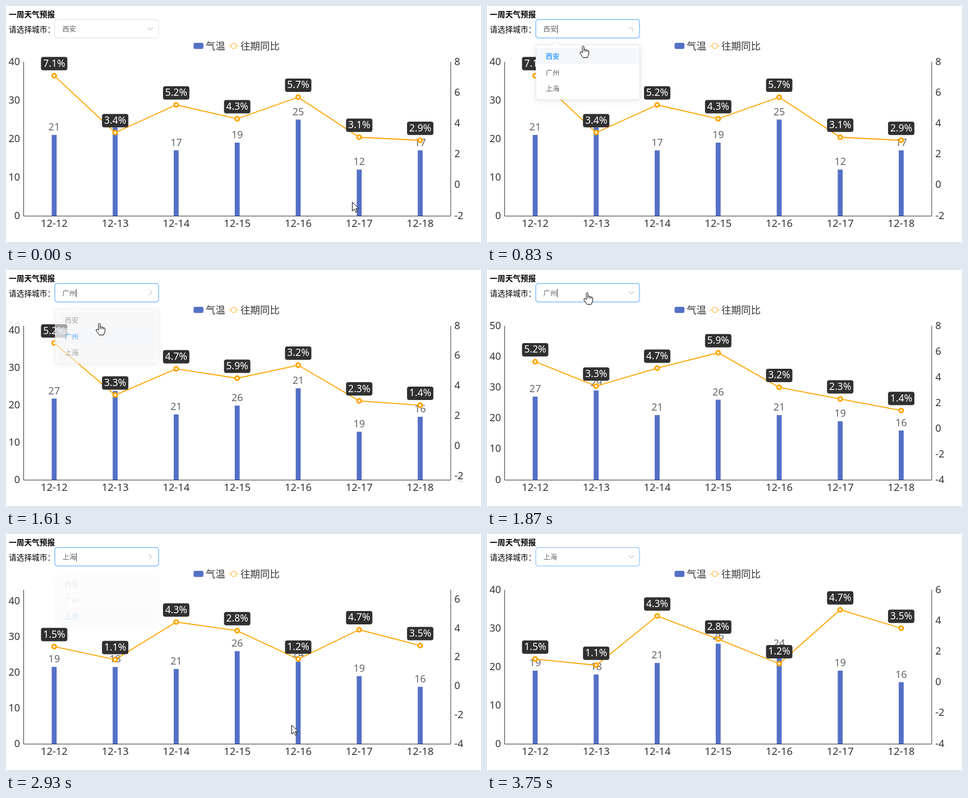
An HTML page with a canvas for the animation above (3790 ms loop, 847 by 423 pixels).

```html
<!DOCTYPE html>
<html lang="zh-CN">
<head>
<meta charset="utf-8">
<title>一周天气预报</title>
<style>
html, body { margin: 0; width: 100%; height: 100%; overflow: hidden; background: #fff; }
canvas { display: block; }
</style>
</head>
<body>
<canvas id="stage" width="847" height="423"></canvas>
<script>
const ctx = document.getElementById('stage').getContext('2d');
const LOOP = 3790;
const LATIN = '"Noto Sans", "Open Sans", sans-serif';
const CJK = '"Noto Sans CJK SC", "Noto Sans CJK", sans-serif';
const BLUE = '#409eff', BAR = '#5470c6', ORANGE = '#ffa500';

const days = [12, 13, 14, 15, 16, 17, 18].map(d => '12-' + d);
const cities = [
  { name: '西安', temp: [21, 23, 17, 19, 25, 12, 17], rate: [7.1, 3.4, 5.2, 4.3, 5.7, 3.1, 2.9], left: [0, 40], right: [-2, 8] },
  { name: '广州', temp: [27, 29, 21, 26, 21, 19, 16], rate: [5.2, 3.3, 4.7, 5.9, 3.2, 2.3, 1.4], left: [0, 50], right: [-4, 8] },
  { name: '上海', temp: [19, 18, 21, 26, 24, 19, 16], rate: [1.5, 1.1, 4.3, 2.8, 1.2, 4.7, 3.5], left: [0, 40], right: [-4, 6] }
];

const plot = { x0: 31.5, x1: 793, top: 100, bottom: 376 };
const menus = [
  { open: 600, shut: 1490, shutEnd: 1760, turn: 620, back: 1500, active: 0, hoverAt: 860, hover: 1 },
  { open: 2010, shut: 2650, shutEnd: 2970, turn: 2070, back: 2840, active: 1, hoverAt: 2340, hover: 2 }
];
const clicks = [580, 1410, 1990, 2570];
// pointer hot spot: time, x, y
const trail = [
  [40, 618, 352], [200, 460, 170], [310, 238, 3], [350, 200, 13], [530, 179, 42],
  [680, 179, 42], [1080, 157, 122], [1120, 159, 126], [1490, 159, 126], [1830, 178, 41],
  [2070, 178, 41], [2320, 143, 136], [2490, 142, 147], [2830, 142, 147],
  [2930, 510, 343], [2990, 514, 350], [3080, 560, 445]
];

const lerp = (a, b, p) => a + (b - a) * p;
const ramp = (t, a, b) => Math.min(1, Math.max(0, (t - a) / (b - a)));
const cubicInOut = p => p < .5 ? 4 * p ** 3 : 1 - 4 * (1 - p) ** 3;
const cubicOut = p => 1 - (1 - p) ** 3;
const within = (t, a, b) => t >= a && t < b;
const scaleY = (v, [lo, hi]) => lerp(plot.bottom, plot.top, (v - lo) / (hi - lo));
const dayX = i => plot.x0 + (plot.x1 - plot.x0) * (i + .5) / days.length;

function text(str, x, y, size, color, align = 'left', family = LATIN, weight = '') {
  ctx.font = `${weight} ${size}px ${family}`;
  ctx.textAlign = align;
  ctx.fillStyle = color;
  ctx.fillText(str, x, y + size * (family === CJK ? .38 : .335));
}

function box(x, y, w, h, r, fill, stroke) {
  ctx.beginPath();
  ctx.roundRect(x, y, w, h, r);
  if (fill) { ctx.fillStyle = fill; ctx.fill(); }
  if (stroke) { ctx.strokeStyle = stroke; ctx.lineWidth = 1; ctx.stroke(); }
}

function polyline(points, color, width) {
  ctx.beginPath();
  points.forEach(([x, y]) => ctx.lineTo(x, y));
  ctx.strokeStyle = color;
  ctx.lineWidth = width;
  ctx.stroke();
}

function ring(x, y, r, width) {
  ctx.beginPath();
  ctx.arc(x, y, r, 0, 7);
  ctx.fillStyle = '#fff';
  ctx.fill();
  ctx.strokeStyle = ORANGE;
  ctx.lineWidth = width;
  ctx.stroke();
}

function axisLabels(from, to, p, step, x, align) {
  for (let v = to[0]; v <= to[1]; v += step) {
    const kept = v >= from[0] && v <= from[1];
    ctx.globalAlpha = kept ? 1 : p;
    const end = scaleY(v, to);
    text(String(v), x, (kept ? lerp(scaleY(v, from), end, p) : end) - .5, 18, '#333', align);
  }
  ctx.globalAlpha = 1;
}

function drawChart(t) {
  const second = t >= 2650;
  const to = cities[second ? 2 : t >= 1480 ? 1 : 0];
  const from = cities[second ? 1 : 0];
  const p = cubicInOut(second ? ramp(t, 2658, 3158) : ramp(t, 1480, 1870));
  const mix = (key, axis, i) => lerp(scaleY(from[key][i], from[axis]), scaleY(to[key][i], to[axis]), p);

  box(334.5, 66, 17.5, 11, 3, BAR);
  text('气温', 356, 71.5, 17.5, '#333', 'left', CJK);
  polyline([[397, 71.5], [415, 71.5]], '#ffc04d', 1);
  ring(406, 71.5, 4.7, 1);
  text('往期同比', 418, 71.5, 17.5, '#333', 'left', CJK);

  axisLabels(from.left, to.left, p, 10, 25, 'right');
  axisLabels(from.right, to.right, p, 2, 799.5, 'left');
  days.forEach((d, i) => text(d, dayX(i), 389.5, 18.4, '#333', 'center'));

  const tops = days.map((d, i) => mix('temp', 'left', i));
  ctx.fillStyle = BAR;
  tops.forEach((y, i) => ctx.fillRect(dayX(i) - 4.4, y, 8.8, plot.bottom - y));
  polyline([[plot.x0, plot.top], [plot.x0, 376.5], [plot.x1, 376.5], [plot.x1, plot.top]], '#333', 1);
  tops.forEach((y, i) => text(String(to.temp[i]), dayX(i), y - 14, 18, '#666', 'center'));

  const points = days.map((d, i) => [dayX(i), mix('rate', 'right', i)]);
  polyline(points, ORANGE, 1.8);
  points.forEach(([x, y]) => ring(x, y, 3.6, 3));
  points.forEach(([x, y], i) => {
    box(x - 23.5, y - 33.5, 47, 24, 4, '#303030');
    text(to.rate[i].toFixed(1) + '%', x, y - 22, 17.6, '#fff', 'center');
  });
}

function caret(x, y) {
  ctx.fillStyle = '#444';
  ctx.fillRect(x, y - 7, 1, 15);
}

function drawSelect(t) {
  const city = cities[t >= 2650 ? 2 : t >= 1490 ? 1 : 0];
  let border = within(t, 480, 590) ? '#c0c4cc' : '#dcdfe6';
  if (t >= 590) {
    const fade = ramp(t, 3700, 3850);
    const [r, g, b] = [[64, 220], [158, 223], [255, 230]].map(([a, z]) => Math.round(lerp(a, z, fade)));
    border = `rgb(${r},${g},${b})`;
  }
  box(87, 24.25, 185, 33, 4, '#fff', border);
  text(city.name, 100.5, 41, 12.2, '#606266', 'left', CJK);
  if (within(t, 600, 1120) || within(t, 1490, 3440)) caret(125, 41);

  const turn = menus.reduce((a, m) => a + ramp(t, m.turn, m.turn + 270) - ramp(t, m.back, m.back + 190), 0);
  ctx.save();
  ctx.translate(257.5, 40.8);
  ctx.rotate(-Math.PI * turn);
  polyline([[-4.7, -2.3], [0, 2.3], [4.7, -2.3]], '#c0c4cc', 1.1);
  ctx.restore();
}

function drawMenu(t) {
  const m = menus.find(m => within(t, m.open, m.shutEnd));
  if (!m) return;
  const shown = cubicOut(ramp(t, m.open, m.open + 260));
  const active = t >= m.shut ? m.hover : m.active;
  const hover = t >= m.hoverAt ? m.hover : m.active;
  ctx.save();
  ctx.globalAlpha = shown * (1 - ramp(t, m.shut, m.shutEnd));
  ctx.translate(0, 69);
  ctx.scale(1, shown);
  ctx.translate(0, -69);
  ctx.shadowColor = 'rgba(0,0,0,.12)';
  ctx.shadowBlur = 12;
  ctx.shadowOffsetY = 2;
  box(87.5, 69.5, 185, 98, 4, '#fff');
  ctx.shadowColor = 'transparent';
  box(87.5, 69.5, 185, 98, 4, null, '#e4e7ed');
  ctx.beginPath();
  ctx.moveTo(117, 70.5);
  ctx.lineTo(123, 64.5);
  ctx.lineTo(129, 70.5);
  ctx.fillStyle = '#fff';
  ctx.fill();
  polyline([[117, 69.5], [123, 64.5], [129, 69.5]], '#ebeef5', 1);
  cities.forEach((c, i) => {
    const y = 90 + 29 * i;
    if (i === hover) {
      ctx.fillStyle = '#f5f7fa';
      ctx.fillRect(88, y - 15, 184, 29);
    }
    const on = i === active;
    text(c.name, 104.8, y, 12.2, on ? BLUE : '#606266', 'left', CJK, on ? 'bold' : '');
  });
  if (within(t, 1120, 1490)) caret(129, 118);
  ctx.restore();
}

const arrow = new Path2D('M.5 .5V16.5L4.2 13L7 18.8L9.4 17.7L6.8 12H12Z');
const hand = new Path2D('M5 1.7Q6.5 -.6 8 1.7V7Q9.7 5.7 11 7.6Q12.6 6.6 13.7 8.6Q15.6 7.8 16.5 10V15L14 21.5H6.3L.8 13.8Q.3 10.6 3 11.2L5 13.2Z');
const knuckles = new Path2D('M8 7V11M11 7.6V11M13.7 8.6V11.5');

function drawPointer(t) {
  const last = trail[trail.length - 1];
  if (t > last[0]) return;
  let [, x, y] = trail[0];
  for (let i = 1; i < trail.length; i++) {
    const a = trail[i - 1], b = trail[i];
    if (t >= a[0]) {
      const p = ramp(t, a[0], b[0]);
      x = lerp(a[1], b[1], p);
      y = lerp(a[2], b[2], p);
    }
  }
  if (clicks.some(c => within(t, c, c + 80))) {
    ctx.beginPath();
    ctx.arc(x - 2, y, 12, 0, 7);
    ctx.fillStyle = 'rgba(255,248,70,.75)';
    ctx.fill();
  }
  const overMenu = menus.some(m => within(t, m.open, m.shutEnd)) && y < 167;
  const isHand = x > 87 && x < 272 && (within(y, 24, 58) || overMenu);
  ctx.save();
  ctx.translate(Math.round(x) - (isHand ? 6 : 1), Math.round(y) - 1);
  ctx.fillStyle = '#fff';
  ctx.strokeStyle = '#000';
  ctx.lineWidth = 1;
  ctx.fill(isHand ? hand : arrow);
  ctx.stroke(isHand ? hand : arrow);
  if (isHand) ctx.stroke(knuckles);
  ctx.restore();
}

function draw(t) {
  ctx.fillStyle = '#fff';
  ctx.fillRect(0, 0, 847, 423);
  text('一周天气预报', 5, 15, 13.7, '#000', 'left', CJK, 'bold');
  text('请选择城市：', 5, 42, 13.7, '#000', 'left', CJK);
  drawChart(t);
  drawSelect(t);
  drawMenu(t);
  drawPointer(t);
}

const start = performance.now();
function tick() {
  draw((performance.now() - start) % LOOP);
  requestAnimationFrame(tick);
}
tick();
</script>
</body>
</html>
```
